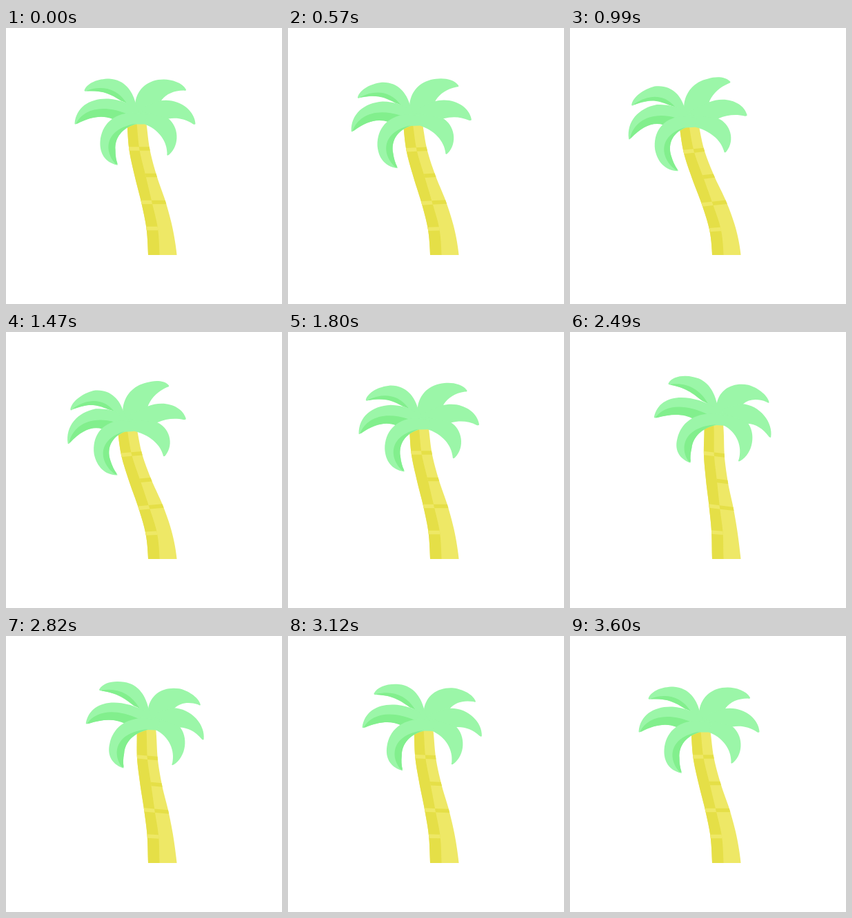
An HTML page with a canvas that plays this animation: 400 px wide and 400 px high, repeating every 3.63 s.

```html
<!DOCTYPE html>
<html lang="en">
<head>
<meta charset="utf-8">
<title>Palm tree</title>
<style>
html, body { margin: 0; width: 100%; height: 100%; overflow: hidden; background: #fff; }
canvas { display: block; width: 400px; height: 400px; }
</style>
</head>
<body>
<canvas id="stage" width="400" height="400"></canvas>
<script>
const ctx = document.getElementById('stage').getContext('2d');
const LOOP = 3630;
const HUB = [187, 107], BASE = 328.5, REACH = 93;
const LEAF = '#9bf6a8', SHADE = '#82ef8d', BARK = '#eee866', BARK_SHADE = '#e5df47';

// Fronds back to front: gain for swinging right / left, outline, shaded part
const fronds = [
  { gain: [1.12, 1.3],
    leaf: 'M113,90C117,79 133,73 149,73C172,74 183,92 187,107L200,125L180,125L173,108C160,97 146,90 117,91Q113,92 113,90Z',
    shade: 'M117,90C140,82 161,88 174,108L166,105C150,95 140,90 117,91Z' },
  { gain: [.68, 1],
    leaf: 'M99,138C101,114 121,101 148,102Q161,103 174,108L200,122L185,137L155,131C140,125 122,128 103,138Q99,140 99,138Z',
    shade: 'M101,138C111,118 138,109 175,124L155,132C140,125 122,128 103,138Z' },
  { gain: [1, 1], leaf: 'M187,108L222,107L232,130L203,138L188,138L176,122Z' },
  { gain: [1.6, 1.45],
    leaf: 'M187,107C190,87 206,74 228,74C240,74 255,79 260,88Q262,91 257,90C243,90 232,95 225,104L215,125L195,130Z' },
  { gain: [1.25, 1],
    leaf: 'M222,105C250,100 273,119 274,138Q274,140 271,139C259,131 247,129 235,131L205,135L195,115Z' },
  { gain: [1.1, .9],
    leaf: 'M234,130C250,142 252,169 236,183Q232,186 233,181C233,165 222,146 198,138L188,138L195,120Z' },
  { gain: [.8, .91],
    leaf: 'M160,198C143,194 135,181 136,164C138,140 154,124 182,122L205,125L200,139L188,139C168,144 157,158 158,176Q158,188 161,196Q162,199 160,198Z',
    shade: 'M159,197C142,180 140,146 188,138C168,145 157,158 158,176Q158,188 161,196Z' }
];

// Trunk edges: x at six evenly spaced heights from y = 138 to the base
const TOP = 138, STEP = 38;
const left = [175, 178, 186, 195.5, 203, 205.5];
const mid = [189, 193, 202, 211, 219.5, 222];
const right = [203, 208, 218, 231, 241, 247];

function edgeX(pts, y) {
  const u = (y - TOP) / STEP;
  const i = Math.max(0, Math.min(4, Math.floor(u))), f = u - i;
  const b = pts[i], c = pts[i + 1];
  if (f < 0) return b + f * (c - b);
  const a = i ? pts[i - 1] : 2 * b - c;
  const d = i < 4 ? pts[i + 2] : c + (c - b) * .4;
  return b + f * (c - a + f * (2 * a - 5 * b + 4 * c - d + f * (3 * (b - c) + d - a))) / 2;
}

const smooth = u => u * u * (3 - 2 * u);

// Rest -> left extreme -> right extreme -> rest
function sway(t, t1, v1, t2, v2) {
  if (t < t1) return v1 * smooth(t / t1);
  if (t < t2) return v1 + (v2 - v1) * smooth((t - t1) / (t2 - t1));
  return v2 * (1 - smooth((t - t2) / (LOOP - t2)));
}

// Bend a trunk point like a rod fixed at its base
function bend(x, y, dx) {
  const len = BASE - HUB[1], h = (BASE - y) / len;
  const tilt = dx * h * (4.7 - 4.65 * h) / len;
  const sag = (.005 * dx * dx - .03 * dx) * (1 - (1 - h) ** 2);
  return [x + dx * h * h * (2.35 - 1.55 * h), y + sag + (x - edgeX(mid, y)) * tilt];
}

function strip(from, to, y0, y1, color, dx) {
  const n = Math.max(2, Math.ceil((y1 - y0) / 4));
  ctx.beginPath();
  for (let i = 0; i <= n; i++) {
    const y = y0 + (y1 - y0) * i / n;
    ctx.lineTo(...bend(edgeX(from, y), y, dx));
  }
  for (let i = n; i >= 0; i--) {
    const y = y0 + (y1 - y0) * i / n;
    ctx.lineTo(...bend(edgeX(to, y), y, dx));
  }
  ctx.fillStyle = color;
  ctx.fill();
}

function drawTrunk(dx) {
  strip(left, right, 126, BASE, BARK, dx);
  strip(left, mid, 126, BASE, BARK_SHADE, dx);
  for (const y of [171.8, 249.3, 287.3]) strip(left, mid, y, y + 5.5, BARK, dx);
  for (const y of [171.8, 210.3, 249.3]) strip(mid, right, y, y + 5.5, BARK_SHADE, dx);
}

// Curl a path around the hub: the turn grows with the distance
function curl(path, angle) {
  return new Path2D(path.replace(/([\d.]+),([\d.]+)/g, (_, px, py) => {
    const x = px - HUB[0], y = py - HUB[1];
    const a = angle * Math.hypot(x, y) / REACH;
    const c = Math.cos(a), s = Math.sin(a);
    return `${(x * c - y * s).toFixed(3)},${(x * s + y * c).toFixed(3)}`;
  }));
}

function drawCrown(dx, rot) {
  ctx.save();
  ctx.translate(HUB[0] + dx, HUB[1] - .45 * rot);
  for (const { gain, leaf, shade } of fronds) {
    const angle = rot * gain[rot > 0 ? 0 : 1] * Math.PI / 180;
    ctx.fillStyle = LEAF;
    ctx.fill(curl(leaf, angle));
    if (shade) {
      ctx.fillStyle = SHADE;
      ctx.fill(curl(shade, angle));
    }
  }
  ctx.restore();
}

const start = performance.now();
function draw() {
  const t = (performance.now() - start) % LOOP;
  const dx = sway(t, 1210, -24.5, 2400, 25.8);
  const rot = sway(t, 1290, -13.4, 2500, 10);
  ctx.fillStyle = '#fff';
  ctx.fillRect(0, 0, 400, 400);
  ctx.save();
  ctx.translate(.5, .5);
  drawTrunk(dx);
  drawCrown(dx, rot);
  ctx.restore();
  requestAnimationFrame(draw);
}
draw();
</script>
</body>
</html>
```
